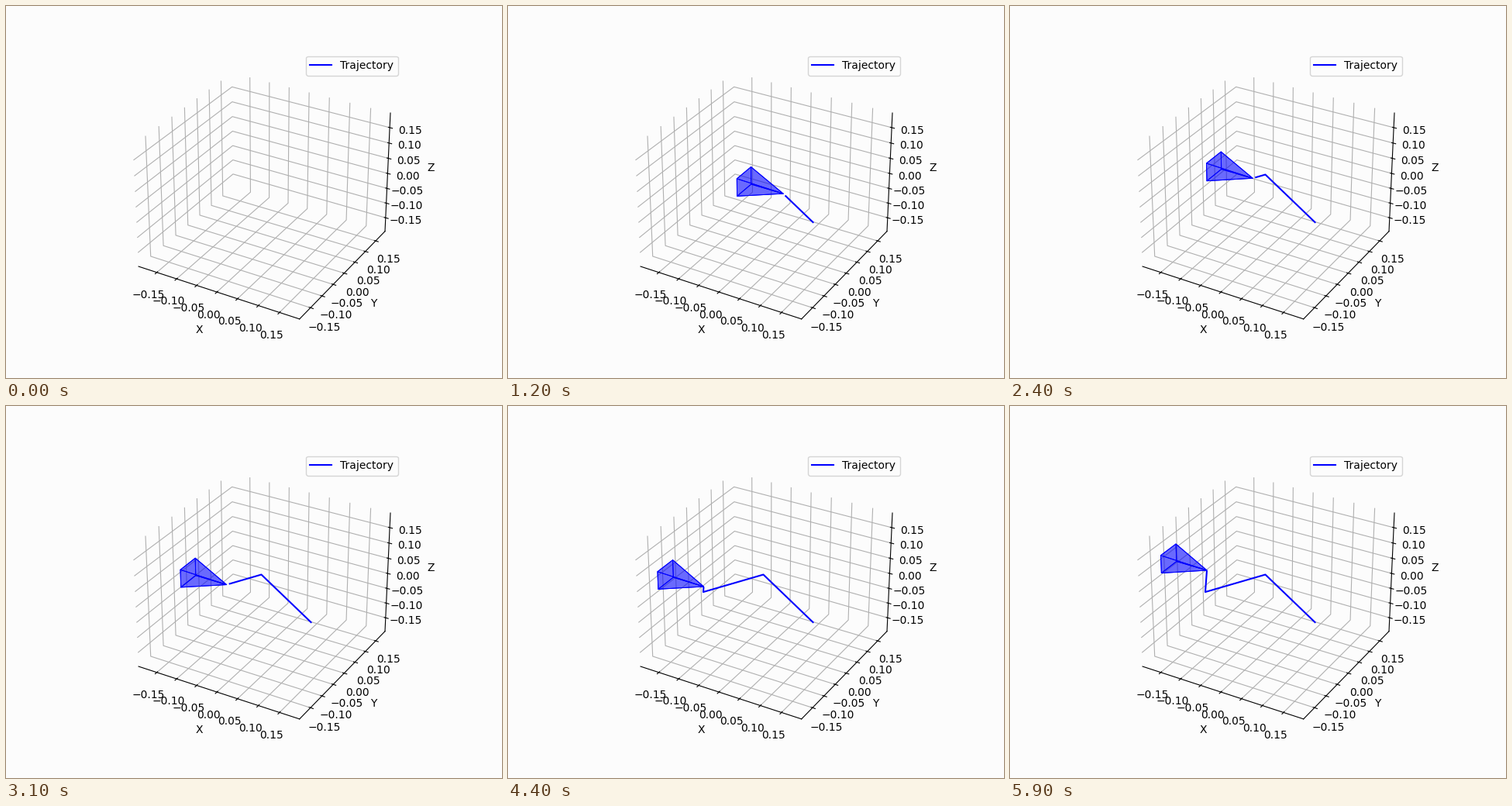
A matplotlib script for the animation above (6000 ms loop, 640x480 px).

```python
import numpy as np
import matplotlib.pyplot as plt
from matplotlib.animation import FuncAnimation
from matplotlib.collections import LineCollection
from mpl_toolkits.mplot3d import proj3d
from mpl_toolkits.mplot3d.art3d import Poly3DCollection

FRAMES = 60
LIMIT = 0.1967
PAPER = "#fcfcfc"
WIRE_UNTIL = 10  # the cone is an open wireframe until this step

# Way points of the camera and the steps at which it reaches them
STOPS = [0, 20, 39, 59]
POINTS = np.array([
    [0.0508, 0.1202, -0.1708],
    [-0.0710, 0.1109, -0.0486],
    [-0.1768, 0.0275, -0.0933],
    [-0.1858, 0.0501, -0.0377],
])
path = np.column_stack(
    [np.interp(np.arange(FRAMES), STOPS, POINTS[:, k]) for k in range(3)])

# Tip and the four base corners, relative to the camera position
LENGTH, HALF_Y, HALF_Z, LIFT = 0.101, 0.031, 0.030, 0.003
SHAPE = np.array([
    [0, 0, 0],
    [-LENGTH, HALF_Y, LIFT + HALF_Z],
    [-LENGTH, -HALF_Y, LIFT + HALF_Z],
    [-LENGTH, -HALF_Y, LIFT - HALF_Z],
    [-LENGTH, HALF_Y, LIFT - HALF_Z],
])
FACES = [[0, 1, 2], [0, 2, 3], [0, 3, 4], [0, 4, 1], [1, 2, 3, 4]]
EDGES = [(0, 1), (0, 2), (0, 3), (0, 4), (1, 2), (2, 3), (3, 4), (4, 1)]
HULL = [0, 1, 2, 3]

fig = plt.figure(figsize=(6.4, 4.8), dpi=100, facecolor=PAPER)
ax = fig.add_subplot(projection="3d")
ax.set_facecolor("none")

trail, = ax.plot([], [], [], color="b", label="Trajectory")
cone = Poly3DCollection([(path[0] + SHAPE)[f] for f in FACES],
                        facecolors="b", edgecolors="b",
                        linewidths=0.7, alpha=0.35)
ax.add_collection3d(cone)

ticks = np.arange(-3, 4) * 0.05
ax.set(xlim=(-LIMIT, LIMIT), ylim=(-LIMIT, LIMIT), zlim=(-LIMIT, LIMIT),
       xticks=ticks, yticks=ticks, zticks=ticks,
       xlabel="X", ylabel="Y", zlabel="Z")
for axis in (ax.xaxis, ax.yaxis, ax.zaxis):
    axis.set_pane_color((1, 1, 1, 0))
ax.yaxis.pane.set_edgecolor("#ebebeb")
ax.yaxis.pane.set_linewidth(0.5)
ax.legend(loc="upper right", facecolor=PAPER)

wires = LineCollection([], colors=[(0, 0, 1, 0.65)], linewidths=0.7,
                       transform=ax.transData, zorder=3)
fig.add_artist(wires)


def flat_cone(i):
    """Cone at step i, projected onto the axes plane."""
    x, y, _ = proj3d.proj_transform(*(path[i] + SHAPE).T, ax.get_proj())
    return np.column_stack([x, y])


def cross(a, b):
    return a[0] * b[1] - a[1] * b[0]


def clip(p, q, hull):
    """Part of segment pq inside a convex, counter-clockwise hull, or None."""
    lo, hi = 0.0, 1.0
    for a, b in zip(hull, np.roll(hull, -1, axis=0)):
        start = cross(b - a, p - a)
        slope = cross(b - a, q - p)
        if abs(slope) < 1e-12:
            if start < -1e-9:
                return None
        elif slope > 0:
            lo = max(lo, -start / slope)
        else:
            hi = min(hi, -start / slope)
    if lo >= hi:
        return None
    return p + lo * (q - p), p + hi * (q - p)


def wire_segments(i):
    """Edges at step i, and earlier ones where later cones cover them."""
    cones = [flat_cone(j) for j in range(1, i + 1)]
    segments = [(cones[-1][a], cones[-1][b]) for a, b in EDGES]
    last = cones[-1][HULL]
    for old, following in zip(cones, cones[1:]):
        for a, b in EDGES:
            part = clip(old[a], old[b], last)
            part = part and clip(*part, following[HULL])
            if part:
                segments.append(part)
    return segments


def update(i):
    trail.set_data_3d(*path[:i].T)
    cone.set_visible(i > WIRE_UNTIL)
    cone.set_verts([(path[i] + SHAPE)[f] for f in FACES])
    open_wire = 0 < i <= WIRE_UNTIL
    wires.set_visible(open_wire)
    wires.set_segments(wire_segments(i) if open_wire else [])
    return trail, cone, wires


anim = FuncAnimation(fig, update, frames=FRAMES, interval=100, repeat=True)
plt.show()
```
